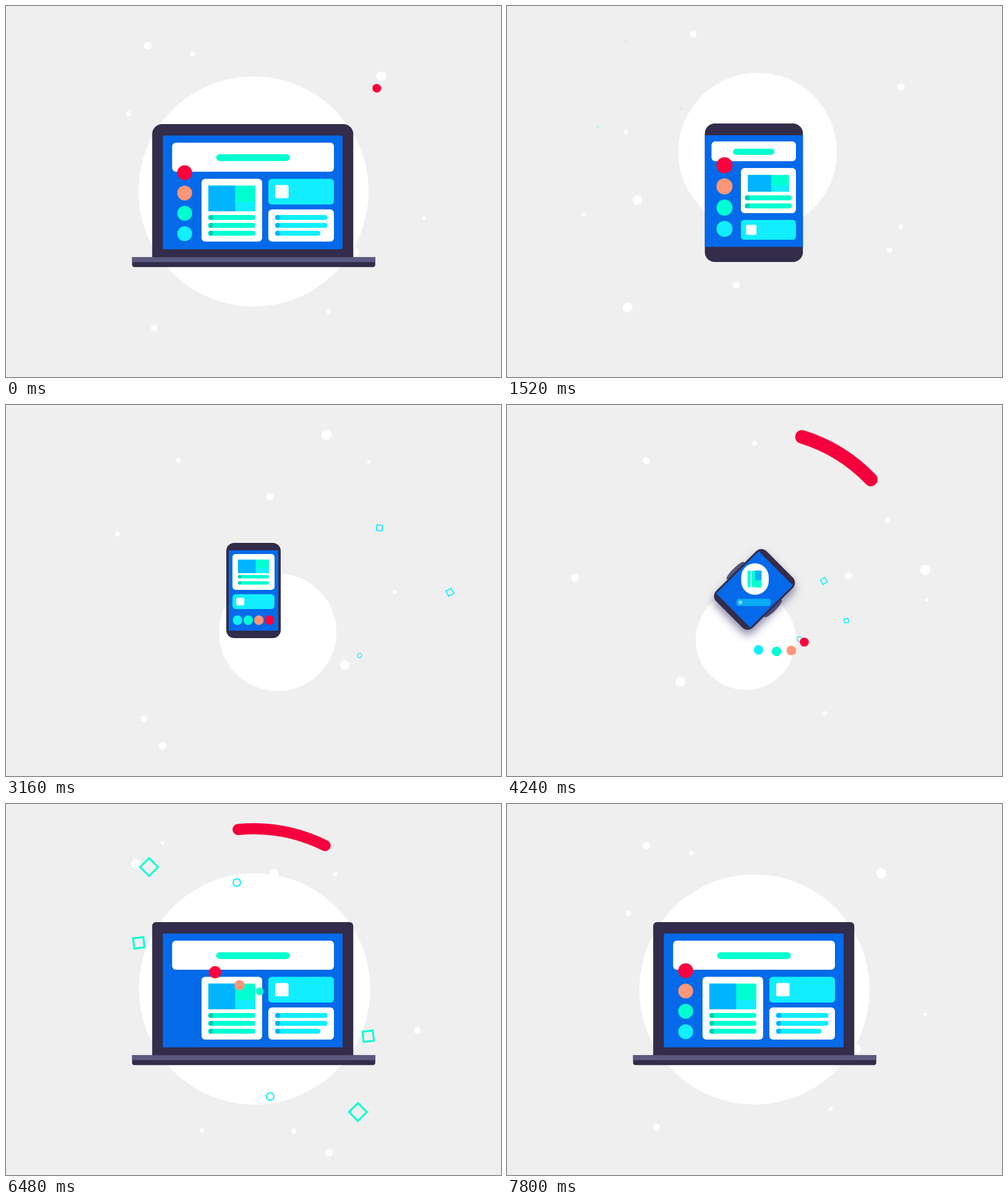
An HTML page with a canvas that plays this animation: 800 px wide and 600 px high, repeating every 7.96 s.

```html
<!DOCTYPE html>
<html lang="en">
<head>
<meta charset="utf-8">
<title>Responsive devices</title>
<style>
html, body { margin: 0; width: 100%; height: 100%; overflow: hidden; background: #efefef; }
canvas { display: block; }
</style>
</head>
<body>
<canvas id="stage" width="800" height="600"></canvas>
<script>
const g = document.getElementById('stage').getContext('2d');
const LOOP = 7960, RAD = Math.PI / 180;
const DARK = '#332c4a', SLATE = '#5b597f', BLUE = '#046ae9', SKY = '#00b4ff',
  CYAN = '#12eeff', TEAL = '#00ffd0', DEEP = '#00cfb2', RED = '#ff003e', SALMON = '#ff9678';

// Smooth monotone interpolation; each key is [time, ...values].
function at(keys, t) {
  const last = keys.length - 1;
  let i = 0;
  while (i < last - 1 && t > keys[i + 1][0]) i++;
  const slope = (j, c) => (keys[j + 1][c] - keys[j][c]) / (keys[j + 1][0] - keys[j][0]);
  const tangent = (j, c) => {
    if (j === 0 || j === last) return 0;
    const a = slope(j - 1, c), b = slope(j, c);
    return a * b <= 0 ? 0 : 2 * a * b / (a + b);
  };
  const span = keys[i + 1][0] - keys[i][0];
  const u = Math.min(1, Math.max(0, (t - keys[i][0]) / span)), v = 1 - u;
  return keys[i].slice(1).map((p, k) => {
    const c = k + 1;
    return v * v * (1 + 2 * u) * p + u * u * (3 - 2 * u) * keys[i + 1][c]
      + span * u * v * (v * tangent(i, c) - u * tangent(i + 1, c));
  });
}

// Rows are the poses laptop, tablet, swing, phone, turn, watch and, if it differs, seed.
const times = [0, 760, 1960, 2280, 2800, 3920, 4240, 4700, 5880, 5881, 6400, LOOP];
const order = [...'011233455600'];
const track = rows => times.map((t, i) => [t, ...(rows[order[i]] || rows[5])]);

function disc(x, y, r, fill) {
  g.fillStyle = fill;
  g.beginPath();
  g.arc(x, y, Math.max(0, r), 0, 7);
  g.fill();
}

function box(x, y, w, h, r, fill) {
  g.fillStyle = fill;
  g.beginPath();
  g.roundRect(x, y, w, h, r);
  g.fill();
}

function line(x, y, w, h, fill, dot) {
  box(x, y, w, h, h / 2, fill);
  disc(x + h / 2, y + h / 2, h / 2, dot);
}

function layer(alpha, draw) {
  if (alpha < 0.01) return;
  g.save();
  g.globalAlpha = alpha;
  draw();
  g.restore();
}

// orbit radius, size, then the angle at the main poses
const dots = [
  [291, 6, 234, 289, 349, 544, 673, 785],
  [243, 3.7, 246, 321, 410, 692, 741, 830],
  [278, 8.2, 318, 449, 531, 713, 883, 947],
  [238, 4.1, 212, 332, 419, 630, 702, 794],
  [279, 2.6, 9, 129, 202, 363, 510, 598],
  [190, 7.8, 31, 122, 213, 489, 565, 640],
  [229, 3.4, 58, 161, 235, 420, 586, 665],
  [273, 5.4, 126, 195, 286, 590, 659, 734],
  [154, 5.7, -30, 56, 132, 351, 482, 560]
].map(([orbit, size, a, b, c, d, e, f]) => {
  const rest1 = b + (c - b) * 0.6, rest2 = c + (d - c) * 0.8;
  return { orbit, size, keys: [[0, a], [760, b], [1600, rest1], [1960, rest1], [2280, c],
    [3520, rest2], [3880, rest2], [4240, d], [5480, e], [5880, e], [6480, f], [7880, a + 720]] };
});

// angle, distance, radius
const halo = [[0, 150, 0, 186], [760, 238, 66, 142], [1600, 275, 64, 128], [1960, 275, 64, 128],
  [2280, 346, 60, 119.5], [2800, 420, 78, 95], [3920, 420, 78, 95], [4240, 460, 81, 81],
  [5480, 610, 57, 59.5], [5880, 610, 57, 59.5], [6480, 694, 2, 187], [7300, 870, 0, 186]];

// start, middle and end time; first angle, tail and head in the middle, last angle
const arcs = [
  [0, 300, 700, -40, 40, 95, 205],
  [1960, 2280, 2720, 150, 186.8, 219.4, 362],
  [3920, 4240, 4760, 255, 287, 316, 520],
  [5880, 6480, 6700, 165, 264.3, 296.2, 335]
].map(([t0, tm, t1, a0, tail, head, a1]) =>
  [[t0, a0, a0, 14], [tm, tail, head, t0 > 5000 ? 18 : 22], [t1, a1, a1, 0]]);

// sides (0 = ring), angle, distance, radius, turn, line width
const fan = [[0, 184, 241, 9.6, 0, 3], [4, 150, 138, 11, 37, 2.5], [4, 151, 247, 9.7, -5, 2.7],
  [3, 137, 192, 9.5, 94, 2.2], [4, 124, 211, 14, 60, 3.4]];
const trio = [[4, -97, 240, 9.5, 8, 2.5], [4, -124, 172, 9.2, 45, 2.5], [0, -66, 152, 5, 0, 2]];
const small = [[4, -8, 113, 6, 15, 1.6], [4, 18, 156, 4.7, 36, 1.5], [0, 47, 107, 3.8, 0, 1.4]];
const wide = [[4, -130.6, 260, 14.5, 0, 3], [4, -158, 200, 11.8, 38, 3], [0, -99, 175, 6, 0, 2, CYAN]];

// middle and end time, sweep, growth
const bursts = [
  [TEAL, fan, 760, 1600, 80, 1.3],
  [CYAN, trio, 2280, 3520, 115, 1.35],
  [CYAN, small, 4240, 5480, 120, 2.2],
  [TEAL, wide, 6480, 7800, 130, 1.35],
  [TEAL, wide, 6480, 7440, 115, 1.35, 180]
].map(([color, parts, tm, t1, sweep, grow, turn = 0]) => ({ color, parts, turn,
  keys: [[tm - 280, -60, 0.4, 0.2], [tm, 0, 1, 1],
    [(tm + t1) / 2, sweep * 0.65, 1 + (grow - 1) * 0.8, 1 + (grow - 1) * 0.4], [t1, sweep, grow, 0]] }));

// centre, size, rotation, corner; screen size and shift; lift
const body = track([
  [398.75, 306.5, 325, 231, 0, 6, 290.5, 184, -5, 0],
  [399, 302, 158.5, 224, 0, 16, 158.5, 180.5, -2.75, 0],
  [398.5, 299.5, 141, 162, -10.5, 16, 125, 140, -2, 1],
  [400, 300, 88, 154, 0, 13, 80, 130, 0, 0],
  [400, 298.2, 84, 115, 45, 12, 78, 97, 0, 1],
  [401.75, 299, 78, 64, 90, 7, 64, 64, 0, 0],
  [401.75, 299, 64, 78, 0, 7, 64, 64, 0, 0]
]);
const base = [[0, 393, 16], [320, 170, 0], [6060, 64, 0], [6400, 393, 16]];
const strap = [[3960, 0], [4240, 0.24], [4760, 1], [5880, 1]];
const extra = [[0, 1], [260, 0], [6080, 0], [6400, 1]];

// box, alpha
const header = track([
  [268.5, 221, 261.5, 47, 1], [330.5, 219, 136.5, 32, 1], [348, 229.7, 101, 11.5, 0.4],
  [360, 234, 80, 4, 0], [360, 234, 80, 4, 0], [385, 275, 33, 6, 0]
]);
const banner = track([
  [424, 279.5, 106, 41.5, 1], [378, 346, 89, 32, 1], [368, 322, 79, 27, 1],
  [366, 306, 68, 24, 1], [371, 313.5, 55, 11.5, 0.5], [404, 290, 20, 8, 0]
]);
// box, corner; picture margin and height; line margin, height, top, step; turn, alpha
const article = track([
  [316, 279.5, 98, 101.5, 6, 11, 41.5, 11, 8, 58.5, 12.7, 0, 1],
  [378, 262, 89, 73, 6, 11.3, 27, 6.5, 8, 44.2, 13, 0, 1],
  [368, 249, 79, 65, 5, 10, 26, 7.7, 6.5, 40.5, 11, 0, 1],
  [366, 241, 68, 58, 5, 9, 22, 9, 5.5, 34, 10, 0, 1],
  [378.5, 256, 44.5, 51, 22, 11.7, 10.5, 11.7, 5, 22.2, 7, 90, 1],
  [388, 277.5, 29, 29, 14.5, 8, 5, 8, 2, 14, 3, 90, 0],
  [388, 277.5, 29, 29, 14.5, 8, 5, 8, 2, 14, 3, 0, 0]
]);

const balls = [
  [RED, [320, 310, 11.5], [480.5, 383.5, 7.3], [338, 272, 10]],
  [SALMON, [285.5, 312.5, 12.6], [459.5, 397, 7.8], [377.5, 293, 8.3]],
  [TEAL, [271.3, 328, 13], [435.6, 398.5, 7.8], [410, 303, 6.3]],
  [CYAN, [271.3, 357, 13], [406.5, 396, 7.7], [425, 308, 0]]
].map(([color, swing, fly, enter], i) => {
  const laptop = [288.8, 269.5 + 32.9 * i, 12], tablet = [351.5, 257.5 + 34.3 * i, 13];
  const phone = [426 - 17.3 * i, 348, 7.7], watch = [416.7 - 9.9 * i, 317, 4.3];
  const landing = i === 3 ? [341.5, 358.5, 13] : tablet;
  return { color, keys: [[0, ...laptop], [760, ...landing], [960, ...tablet], [1960, ...tablet],
    [2280, ...swing], [2800 + 60 * i, ...phone], [3920, ...phone], [4240, ...fly],
    [4760 + 50 * i, ...watch], [5880, ...watch], [6480, ...enter], [6900 + 80 * i, ...laptop]] };
});

function drawArc(keys, t) {
  if (t < keys[0][0] || t > keys[2][0]) return;
  const [tail, head, width] = at(keys, t);
  if (width < 0.3) return;
  g.strokeStyle = '#f5003c';
  g.lineWidth = width;
  g.lineCap = 'round';
  g.beginPath();
  g.arc(400, 300, 260, tail * RAD, head * RAD + 0.001);
  g.stroke();
}

function drawBurst({ keys, parts, color, turn }, t) {
  if (t < keys[0][0] || t > keys[3][0]) return;
  const [shift, far, scale] = at(keys, t);
  if (scale < 0.02) return;
  for (const [sides, angle, dist, r, spin, width, own] of parts) {
    const a = (angle + shift + turn) * RAD;
    g.save();
    g.translate(400 + Math.cos(a) * dist * far, 300 + Math.sin(a) * dist * far);
    g.rotate((spin + shift) * RAD);
    g.scale(scale, scale);
    g.strokeStyle = own || color;
    g.lineWidth = width;
    g.beginPath();
    if (sides) {
      for (let k = 0; k < sides; k++) {
        const b = k * 2 * Math.PI / sides;
        g.lineTo(r * Math.cos(b), r * Math.sin(b));
      }
      g.closePath();
    } else g.arc(0, 0, r, 0, 7);
    g.stroke();
    g.restore();
  }
}

function drawStraps(w, h, s) {
  g.save();
  g.rotate(-Math.PI / 2);
  if (s > 0.5) {
    box(h / 2 - 12 + 12 * s, 16 - w / 2, 4.5, 15, 2, SLATE);
    box(h / 2 - 12 + 12 * s, 38 - w / 2, 3, 23, 1, SLATE);
  }
  g.fillStyle = SLATE;
  for (const side of [-1, 1]) {
    g.save();
    g.scale(1, side);
    g.translate(0, 24.5 * (1 - s) - w / 2);
    g.beginPath();
    g.moveTo(-26, 1);
    g.bezierCurveTo(-19, -3, -20.5, -13, -20, -20);
    g.bezierCurveTo(-19.5, -25.8, 18.5, -25.8, 19, -20);
    g.bezierCurveTo(19.5, -13, 18, -3, 25, 1);
    g.fill();
    g.restore();
  }
  g.restore();
}

function drawDevice(t) {
  const [x, y, w, h, rot, r, sw, sh, dy, lift] = at(body, t);
  const s = at(strap, t)[0], early = t < 760;
  g.save();
  g.translate(x, y);
  g.rotate(rot * RAD);
  if (s > 0.02 && t < 5881) drawStraps(w, h, s);
  g.save();
  g.shadowColor = `rgba(51, 44, 100, ${0.55 * lift})`;
  g.shadowBlur = 14 * lift;
  g.shadowOffsetY = 8 * lift;
  box(-w / 2, -h / 2, w, h, early ? 16 : r, DARK);
  g.restore();
  box(-sw / 2, dy - sh / 2, sw, sh, early ? 3 : 0, BLUE);
  const [bw, bh] = at(base, t);
  if (bh > 0.2) {
    const left = 1.5 - bw / 2, top = h / 2 - bh + 0.2;
    box(left, top, bw, bh, [0, 0, 4, 4], DARK);
    box(left, top, bw, bh / 2, 0, SLATE);
  }
  g.restore();
}

function drawHeader(t) {
  const [x, y, w, h, alpha] = at(header, t);
  const barW = 10 + 0.417 * w, barH = Math.min(11, 0.31 * h);
  layer(alpha, () => {
    box(x, y, w, h, Math.min(6, h / 3), '#fff');
    box(x + (w - barW) / 2, y + (h - barH) / 2 + 0.7, barW, barH, barH / 2, alpha < 0.6 ? SKY : TEAL);
  });
}

function drawArticle(t, more) {
  const [x, y, w, h, r, margin, ph, inset, lh, top, step, turn, ink] = at(article, t);
  box(x, y, w, h, r, '#fff');
  layer(ink, () => {
    const mix = turn / 90, cw = w + (h - w) * mix, ch = h + (w - h) * mix, pw = cw - 2 * margin;
    g.translate(x + w / 2, y + h / 2);
    g.rotate(turn * RAD);
    g.translate(-cw / 2, -ch / 2);
    for (let i = 0; i < 3; i++) {
      g.globalAlpha = i === 2 ? ink * more : ink;
      line(inset, top + i * step, cw - 2 * inset, lh, TEAL, mix > 0.5 ? TEAL : DEEP);
    }
    g.globalAlpha = ink;
    box(margin, margin, pw, ph, 0, TEAL);
    if (mix < 0.5) box(margin + pw / 2, margin + ph * 0.63, pw / 2, ph * 0.37, 0, CYAN);
    box(margin, margin, pw * 0.57, ph, 0, SKY);
  });
}

function drawBanner(t) {
  const [x, y, w, h, alpha] = at(banner, t), q = h * 0.52;
  layer(alpha, () => {
    box(x, y, w, h, Math.min(5.5, h / 3), CYAN);
    box(x + h * 0.265, y + (h - q) / 2, q, q, 2.5, '#fff');
  });
}

function drawList(more) {
  layer(more, () => {
    g.translate(477, 355);
    g.scale(more, more);
    box(-53, -26, 106, 52, 6, '#fff');
    [84.5, 84.5, 73].forEach((w, i) => line(-42, i * 12.7 - 17, w, 8, CYAN, SKY));
  });
}

function frame() {
  const t = performance.now() % LOOP, more = at(extra, t)[0];
  g.fillStyle = '#efefef';
  g.fillRect(0, 0, 800, 600);
  const polar = (angle, dist, size) =>
    disc(400 + dist * Math.cos(angle * RAD), 300 + dist * Math.sin(angle * RAD), size, '#fff');
  polar(...at(halo, t));
  for (const { orbit, size, keys } of dots) polar(at(keys, t)[0], orbit, size);
  arcs.forEach(keys => drawArc(keys, t));
  bursts.forEach(burst => drawBurst(burst, t));
  drawDevice(t);
  drawHeader(t);
  drawArticle(t, more);
  drawBanner(t);
  drawList(more);
  for (const { color, keys } of balls) disc(...at(keys, t), color);
  requestAnimationFrame(frame);
}
frame();
</script>
</body>
</html>
```
